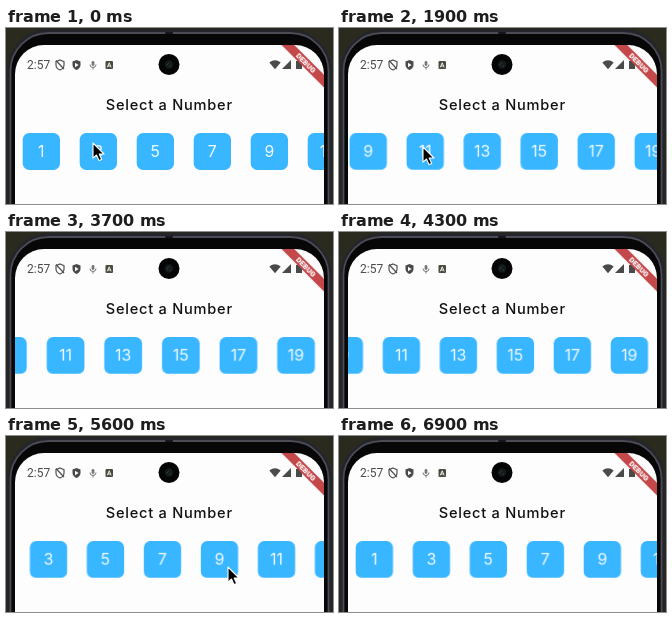
Recreate the animation shown at these times as an HTML page. Size 327 by 176 pixels, loop 7000 ms.

```html
<!DOCTYPE html>
<html lang="en">
<head>
<meta charset="utf-8">
<title>Select a Number</title>
<style>
  html, body { margin: 0; width: 100%; height: 100%; overflow: hidden; background: #2b2a1e; }
  svg { display: block; width: 327px; height: 176px; }
  text { text-anchor: middle; }
  .title { font: 500 14.6px Montserrat, Inter, sans-serif; letter-spacing: .75px; fill: #111; }
  .clock { font: 12px Roboto, sans-serif; text-anchor: start; fill: #4a4a4a; }
  .debug { font: 900 7.6px Roboto, sans-serif; fill: #fff; }
  .tile rect { fill: #38b6ff; }
  .tile text { font: 400 15.8px Montserrat, Inter, sans-serif; fill: #f4fbff; }

  .row, .pull-start, .pull-end, .cursor { animation: 7s linear infinite; }
  .row { animation-name: scroll; }
  .pull-start { animation-name: pull-start; transform-origin: 9px 0; }
  .pull-end { animation-name: pull-end; transform-origin: 318px 0; }
  .cursor { animation-name: cursor; }

  @keyframes scroll {
    0%, 17% { transform: translateX(0); }
    21% { transform: translateX(-88px); }
    24% { transform: translateX(-178px); animation-timing-function: ease-out; }
    27.143% { transform: translateX(-234px); animation-timing-function: ease-out; }
    31%, 71% { transform: translateX(-258px); }
    71.429% { transform: translateX(-257px); animation-timing-function: ease-in; }
    76% { transform: translateX(-200px); animation-timing-function: cubic-bezier(.2, .5, .5, 1); }
    85%, 100% { transform: translateX(0); }
  }
  @keyframes pull-start {
    0%, 4% { transform: scaleX(1); animation-timing-function: ease-out; }
    12.857% { transform: scaleX(1.0137); }
    17%, 100% { transform: scaleX(1); }
  }
  @keyframes pull-end {
    0%, 41% { transform: scaleX(1); animation-timing-function: ease-out; }
    50%, 53.5% { transform: scaleX(1.011); animation-timing-function: ease-out; }
    59%, 100% { transform: scaleX(1); }
  }
  @keyframes cursor {
    0% { transform: translate(87px, 115px); animation-timing-function: ease-in-out; }
    12.857%, 16% { transform: translate(185.5px, 117.5px); animation-timing-function: ease-in-out; }
    24%, 27.143% { transform: translate(84px, 119px); animation-timing-function: ease-in-out; }
    38%, 40% { transform: translate(190px, 122px); animation-timing-function: ease-in-out; }
    50%, 62% { transform: translate(70px, 185px); animation-timing-function: ease-out; }
    70%, 71.429% { transform: translate(170px, 129.5px); animation-timing-function: ease-in-out; }
    78%, 87.143% { transform: translate(222px, 131px); animation-timing-function: ease-in; }
    96%, 100% { transform: translate(250px, 185px); }
  }
</style>
</head>
<body>
<svg viewBox="0 0 327 176">
  <defs>
    <clipPath id="screen"><rect x="9" y="17" width="309" height="260" rx="29"/></clipPath>
    <path id="shield" d="M0-5 4-3.4V0C4 2.4 2.2 4.2 0 5-2.2 4.2-4 2.4-4 0V-3.4Z"/>
  </defs>

  <!-- phone body -->
  <rect x="2.5" y="2.5" width="322" height="280" rx="41" fill="#08080a" stroke="#24252b" stroke-width="3"/>
  <rect x="4.5" y="5" width="318" height="280" rx="38" fill="#070708" stroke="#4b4c55" stroke-width="1.8"/>
  <rect x="159" y="4" width="8" height="2" rx="1" fill="#15151a"/>

  <g clip-path="url(#screen)">
    <rect x="9" y="17" width="309" height="160" fill="#fdfdfd"/>

    <!-- status bar -->
    <text class="clock" x="21" y="41">2:57</text>
    <g fill="none" stroke="#505050" stroke-width="1.2">
      <use href="#shield" x="54" y="37"/>
      <path d="M50 32.5 58 41"/>
    </g>
    <use href="#shield" x="70.5" y="37" fill="#4a4a4a"/>
    <path d="M69 34.8v4.4l3.6-2.2z" fill="#fdfdfd"/>
    <rect x="85.6" y="33" width="2.8" height="5" rx="1.4" fill="#777"/>
    <path d="M84 36.5a3 3 0 0 0 6 0M87 39.5v2" fill="none" stroke="#777"/>
    <rect x="99.5" y="33" width="7.5" height="8" rx="1" fill="#4b4b40"/>
    <path d="M101.3 39.3 103.2 34.8 105.1 39.3M102 38h2.4" fill="none" stroke="#fdfdfd" stroke-width=".9"/>
    <g fill="#4a4a4a">
      <path d="M263.3 34.5Q269 29.8 274.7 34.5L269 41.3Z"/>
      <path d="M276 41 285 32V41Z"/>
      <path d="M290 33h1.5v-1.2h3V33H296v8h-6z"/>
    </g>

    <circle cx="163" cy="36.5" r="10.5" fill="#050506"/>
    <circle cx="163" cy="36.5" r="4.2" fill="#14191b"/>
    <path d="M160.5 37.5 163 34.5M163.5 38.5l1.5-1" stroke="#35443f" fill="none"/>

    <text class="title" x="163.3" y="81.5">Select a Number</text>

    <g class="pull-start"><g class="pull-end"><g class="row" id="row"></g></g></g>

    <!-- corner ribbon -->
    <g transform="translate(318 17) rotate(45)">
      <rect x="-34" y="20.5" width="68" height="10" fill="#000" opacity=".12"/>
      <rect x="-34" y="21" width="68" height="9" fill="#c4474a"/>
      <text class="debug" y="28.2">DEBUG</text>
    </g>
  </g>

  <path class="cursor" d="M0 0V15.2L3.5 12 6 17.6 8.7 16.4 6.2 11H11Z"
        fill="#000" stroke="#fff" stroke-width="1.1" stroke-linejoin="round"/>
</svg>
<script>
  const PITCH = 57, COUNT = 10;
  document.getElementById('row').innerHTML = Array.from({ length: COUNT }, (_, i) =>
    `<g class="tile" transform="translate(${16.7 + i * PITCH} 105)">
      <rect width="37.3" height="37" rx="6.5"/>
      <text x="18.6" y="24">${2 * i + 1}</text>
    </g>`).join('');
</script>
</body>
</html>
```
